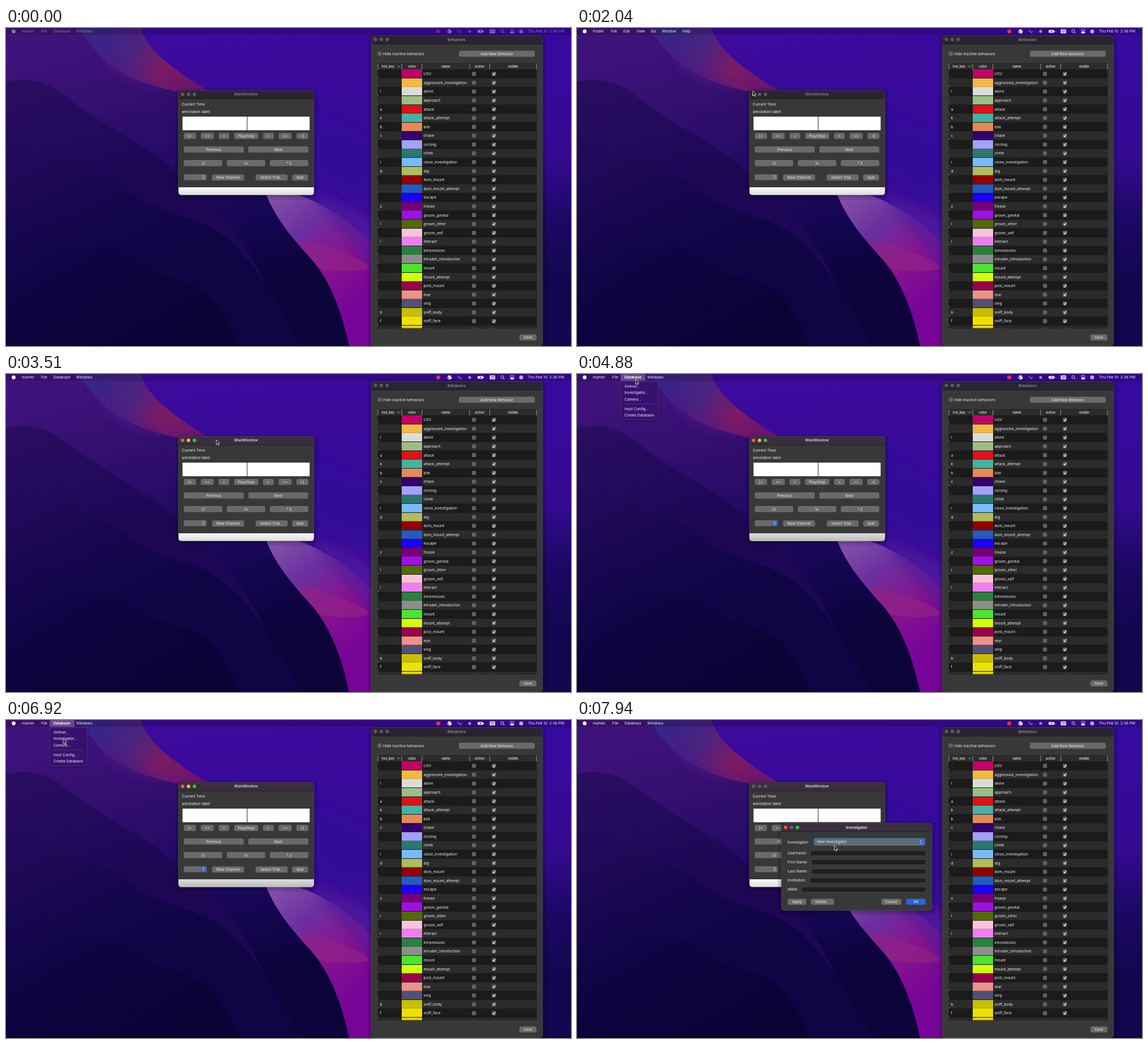
Write an HTML page that moves like this. It is 998 by 561 pixels and loops after 8 s.

```html
<!DOCTYPE html>
<html lang="en">
<head>
<meta charset="utf-8">
<title>Desktop session</title>
<style>
  html, body { margin: 0; width: 100%; height: 100%; overflow: hidden; background: #1b0752; }
  svg { display: block; width: 100vw; height: 100vh; }
  text { font: 6.6px Inter, "Open Sans", sans-serif; fill: #f2f2f2; white-space: pre; }
  .bold { font-weight: 600; }
  .head { font-size: 5.85px; font-weight: 500; }
</style>
</head>
<body>
<svg id="stage" viewBox="0 0 998 561" xmlns="http://www.w3.org/2000/svg"></svg>
<script>
const LOOP = 8000;
const stage = document.getElementById('stage');

// Drawing helpers
const rect = (x, y, x2, y2, fill, r = 0, more = '') =>
  `<rect x="${x}" y="${y}" width="${x2 - x}" height="${y2 - y}" rx="${r}" fill="${fill}" ${more}/>`;
const circle = (x, y, r, fill, more = '') => `<circle cx="${x}" cy="${y}" r="${r}" fill="${fill}" ${more}/>`;
const path = (d, fill, more = '') => `<path d="${d}" fill="${fill}" ${more}/>`;
const line = (d, color, width = 1) => path(d, 'none', `stroke="${color}" stroke-width="${width}"`);
const label = (x, cy, s, more = '') =>
  `<text x="${x}" y="${cy + 2.35}" ${more}>${s.replace(/</g, '&lt;').replace(/>/g, '&gt;')}</text>`;
const centered = (x, cy, s, more = '') => label(x, cy, s, `text-anchor="middle" ${more}`);
const group = (id, body, more = '') => `<g id="${id}" ${more}>${body}</g>`;
const button = (x, x2, cy, s, fill = '#6a6a6a') =>
  rect(x, cy - 5.3, x2, cy + 5.3, fill, 2.5) +
  line(`M${x + 2} ${cy - 5}H${x2 - 2}`, 'rgba(255,255,255,.15)', .5) + centered((x + x2) / 2, cy, s);
const arrows = (x, cy) =>
  line(`M${x - 1.6} ${cy - 1}l1.6 -1.7 1.6 1.7M${x - 1.6} ${cy + 1}l1.6 1.7 1.6 -1.7`, '#fff', .9);
const knob = (x, cy) => rect(x - 4.2, cy - 4.3, x + 4.2, cy + 4.3, '#2b68dc', 2) + arrows(x, cy);
const lights = (x, cy, colors) => colors.map((c, i) => circle(x + i * 10.4, cy, 3.1, c)).join('');
const GREY = Array(3).fill('#5d5761');
const gradient = (id, coords, ...stops) => {
  const [x1, y1, x2, y2] = coords;
  return `<linearGradient id="${id}" gradientUnits="userSpaceOnUse" x1="${x1}" y1="${y1}" x2="${x2}" y2="${y2}">` +
    stops.map((c, i) => `<stop offset="${i / (stops.length - 1)}" stop-color="${c}"/>`).join('') + '</linearGradient>';
};

function wallpaper() {
  const defs = '<defs>' +
    gradient('sky', [500, 0, 560, 561], '#3d0a9c', '#380a9a', '#380b98', '#5a149b', '#680596') +
    gradient('edge', [0, 0, 0, 561], '#360a9f', '#360a9a', '#350a92', '#1c0865', '#13064e', '#14064f') +
    gradient('glow', [470, 300, 620, 480], '#8450aa', '#6b2f9f', '#86148f', '#760597') +
    gradient('hill', [170, 0, 290, 500], '#40137c', '#340f70', '#250a66', '#150653', '#0b033a') +
    gradient('ridge', [170, 15, 325, 112], '#3b2487', '#4d237f', '#7c1b63', '#6b1570') +
    gradient('wave1', [60, 90, 120, 290], '#2a0d60', '#230a5a', '#1d0755') +
    gradient('wave2', [80, 210, 190, 440], '#210a5a', '#15064d', '#0f0444') +
    gradient('wave3', [80, 320, 220, 561], '#170650', '#0c0440', '#0a0336') +
    gradient('status', [0, 281, 0, 294], '#f8f8f8', '#dedede') +
    gradient('statusOn', [0, 281, 0, 294], '#dddddd', '#bdbdbd') +
    '<filter id="soft" x="-10%" y="-10%" width="120%" height="120%"><feGaussianBlur stdDeviation="7"/></filter></defs>';
  return defs +
    rect(0, 0, 998, 561, 'url(#sky)') +
    rect(940, 0, 998, 561, 'url(#edge)') +
    path('M390 150C500 180 545 280 650 330V200C560 140 480 120 390 150Z', '#2d099a', 'opacity=".5" filter="url(#soft)"') +
    path('M450 280C510 286 580 310 650 385V561H590Z', 'url(#glow)') +
    path('M545 292C580 300 620 320 650 350V430C620 380 570 350 545 292Z', '#4b1c9c', 'opacity=".55" filter="url(#soft)"') +
    path('M502 388C530 370 555 378 580 392C605 402 630 405 642 424C605 436 545 425 515 412Z', '#932284', 'opacity=".65"') +
    path('M0 0H130C180 65 250 100 330 112C400 165 435 235 460 295C478 340 510 375 535 403C570 440 592 495 606 561H0Z', 'url(#hill)') +
    path('M125 0H238C250 40 290 70 368 118C290 118 205 90 165 48Z', 'url(#ridge)') +
    path('M172 25C200 70 240 88 300 105C245 112 195 96 172 62Z', '#4b1282', 'opacity=".55" filter="url(#soft)"') +
    path('M0 95C45 86 75 97 105 120C140 148 170 165 210 190C250 215 285 232 310 270C380 310 450 400 500 561H0Z', 'url(#wave1)') +
    path('M0 208C35 190 70 214 105 235C145 258 180 253 215 285C270 335 350 325 405 385C450 430 490 500 520 561H0Z', 'url(#wave2)') +
    path('M0 335C35 318 65 333 90 360C130 400 175 365 215 405C265 450 330 430 370 485C390 510 405 540 412 561H0Z', 'url(#wave3)') +
    rect(0, 0, 998, 12, '#000', 0, 'opacity=".16"');
}

const menuTitles = items => items.map(([x, s], i) => label(x, 6, s, i ? 'font-weight="500"' : 'font-weight="700"')).join('');

function menuBar() {
  const white = '#f0edf6';
  const icons =
    circle(13.5, 6, 3.4, white) +
    circle(763.5, 6, 3.6, '#d23a4c') +
    circle(783.5, 6, 3.8, white) + line('M780 5L783 7 782 9M784 3L786 5 787 4', '#47249c', 1) +
    line('M797 6h2l1 -2 2 5 1 -3h3M797 2l8 8', '#9d8bd0', .7) +
    circle(819, 6, 2.6, '#9d8bd0') +
    rect(833, 3.4, 843, 8.6, white, 1.5) + rect(843.5, 5, 844.5, 7, white) + path('M839 3.7l-2.5 2.8h1.6l-.7 2 2.6 -3h-1.7Z', '#33118b') +
    rect(854.5, 2.5, 864, 9.5, white, 1) + line('M856 4.5h7M856 6h7M857.5 8h4', '#47249c', .7) +
    circle(876.6, 5.4, 2.5, 'none', `stroke="${white}" stroke-width=".9"`) + line('M878.4 7.2l2.3 2.4', white, .9) +
    rect(890.5, 2.5, 897.5, 5.5, 'none', 1.5, `stroke="${white}" stroke-width=".7"`) + rect(890.5, 6.6, 897.5, 9.6, white, 1.5) +
    circle(910, 6, 3.5, '#b9a9d8') +
    label(922, 6, 'Thu Feb 10  2:36 PM', 'font-weight="500"');
  return group('bar-content', icons +
    group('app-menu', menuTitles([[28, 'marten'], [62, 'File'], [84, 'Database'], [124, 'Windows']])) +
    group('desk-menu', menuTitles([[28, 'Folder'], [60, 'File'], [82, 'Edit'], [105, 'View'], [130.5, 'Go'], [150, 'Window'], [186, 'Help']])));
}

const frame = (x, y, x2, y2, titleId, titleFill) =>
  [2, 4, 7].map(d => rect(x - d, y - d / 2, x2 + d, y2 + d * 1.2, '#000', 5 + d, 'opacity=".09"')).join('') +
  rect(x, y, x2, y2, '#383838', 5) +
  path(`M${x} ${y + 14.5}V${y + 5}q0 -5 5 -5H${x2 - 5}q5 0 5 5V${y + 14.5}Z`, titleFill, `id="${titleId}"`) +
  line(`M${x} ${y + 14.8}H${x2}`, '#171519', .7) +
  rect(x, y, x2, y2, 'none', 5, 'stroke="#706b75" stroke-opacity=".65" stroke-width=".6"');

function mainWindow() {
  const row = (cy, items) => items.map(([x, x2, s]) => button(x, x2, cy, s)).join('');
  const status = 'M304.8 281H543.8V289.5q0 5 -5 5H309.8q-5 0 -5 -5Z';
  return frame(304.5, 110, 544, 294.5, 'main-title', '#2a242f') +
    group('lights-off', lights(312, 117, GREY)) +
    group('lights-on', lights(312, 117, ['#f5584f', '#f5bd2f', '#2fc840'])) +
    centered(424, 117, 'MainWindow', 'class="bold" id="main-name"') +
    label(310.5, 134.5, 'Current Time') + label(310.5, 147.3, 'annotation label') +
    rect(311.3, 156, 536.8, 180.8, '#fff', 0, 'stroke="#222" stroke-width=".6"') + line('M426 156V180.8', '#222', 1) +
    row(190.5, [[314, 335.5, '|<'], [344, 367, '<<'], [375.5, 394.5, '<'], [403, 445.5, 'Play/Stop'],
      [454, 473, '>'], [481.5, 504.5, '>>'], [513, 534, '>|']]) +
    row(214.4, [[314, 420, 'Previous'], [428, 534, 'Next']]) +
    row(238.4, [[314, 382, '/2'], [390, 458, '1x'], [466, 534, '* 2']]) +
    row(263.7, [[364, 420.5, 'New Channel'], [441, 497.5, 'Select Trial...'], [505.5, 533.5, 'Quit']]) +
    rect(314, 258, 354.5, 268.5, '#6a6a6a', 2.5) + arrows(349, 263.2) + group('combo-on', knob(349, 263.2)) +
    path(status, 'url(#status)') + path(status, 'url(#statusOn)', 'id="status-on"');
}

const BEHAVIORS = `USV,,c3006a aggressive_investigation,,f4b942 alone,l,d9dbdc approach,,9dbd86 attack,a,e01018
attack_attempt,k,42b3a3 bite,b,e58a57 chase,c,33006e circling,,a3a0fa climb,,2d776e close_investigation,i,78bafa
dig,d,b0bd59 dom_mount,,930000 dom_mount_attempt,,265abd escape,,1a00fa freeze,z,75007a groom_genital,,9d12e0
groom_other,l,526b00 groom_self,,fac2dd interact,i,f27cf6 intromission,,2b803f intruder_introduction,,8d8d8d
mount,,4ae62f mount_attempt,,d2ff0a post_mount,,9b004a rear,,ee9186 sing,,50507a sniff_body,b,c7be07
sniff_face,f,eee000 sniff_genital,,e4d505`.split(/\s+/).map(row => row.split(','));

function behaviorWindow() {
  const box = (x, cy) => rect(x, cy - 3.6, x + 7.2, cy + 3.6, '#626262', 1.6);
  const rows = BEHAVIORS.map(([name, key, color], i) => {
    const top = 73.2 + i * 15.58, cy = top + 7.7;
    return rect(657, top, 937, top + 15.58, i % 2 ? '#2b2b2b' : '#1b1b1b') +
      rect(699, Math.round(top), 735, Math.round(top) + 15, '#' + color) +
      line(`M657.2 ${top + 12.5}v2.6`, '#aaa', .6) + line(`M657 ${top + 15.4}H937`, '#151515', .5) +
      label(660.5, cy, key) + label(737.5, cy, name) + box(823, cy) + box(858.2, cy) +
      line(`M859.8 ${cy + .2}l1.6 1.9 2.6 -4.3`, '#fff', 1.1);
  }).join('');
  const heads = [[675, 'hot_key'], [717, 'color'], [777, 'name'], [836.5, 'active'], [895.7, 'visible']];
  return frame(645.5, 13.5, 948, 560.5, 'list-title', '#29242f') +
    lights(652.5, 20.2, GREY) + centered(796, 20.2, 'Behaviors', 'class="bold" style="fill:#969199"') +
    box(656.5, 45.2) + label(666, 45.2, 'Hide inactive behaviors') + button(800, 934, 45.5, 'Add New Behavior') +
    rect(656.5, 62, 937.5, 530, '#1b1b1b') + rect(657, 62.5, 937, 73, '#2c2c2c') +
    '<clipPath id="list"><path d="M656 73H938V529.5H656Z"/></clipPath>' + `<g clip-path="url(#list)">${rows}</g>` +
    heads.map(([x, s]) => centered(x, 67.8, s, 'class="head"')).join('') +
    line('M691.3 66.8l2 2 2 -2', '#eee', .8) +
    line([657, 699, 734.8, 819, 854.5, 937].map(x => `M${x} 63V73`).join(''), '#c8c8c8', .7) +
    button(907, 937, 546, 'Save');
}

const MENU_ROWS = [[21.5, 'Animal...'], [33, 'Investigator...'], [44.6, 'Camera...'], [61.6, 'Host Config...'], [73, 'Create Database']];

function dropMenu() {
  return rect(77, 0, 121, 12, '#fff', 2, 'opacity=".24"') + label(84, 6, 'Database', 'font-weight="500"') +
    rect(75.5, 13, 145.5, 84, '#000', 5, 'opacity=".18"') +
    rect(77, 13.2, 143.8, 80.8, '#381170', 3.2, 'stroke="#67478f" stroke-width=".6"') +
    rect(79.5, 0, 141.5, 11.4, '#2c60d6', 2, 'id="choice"') +
    MENU_ROWS.map(([cy, s]) => label(84, cy, s, 'font-weight="500"')).join('') +
    line('M83.5 53H137', 'rgba(255,255,255,.2)', .7);
}

function dialog() {
  const fields = [[235, 412.5, 'Username:'], [251, 414, 'First Name:'], [267, 414, 'Last Name:'], [283, 411.5, 'Institution:'], [299, 397, 'eMail:']];
  return frame(361, 182, 627, 336, 'dialog-title', '#382f3c') +
    lights(368.5, 189.5, ['#f5584f', '#66606a', '#2fc840']) + centered(494, 189.5, 'Investigator', 'class="bold"') +
    label(372, 215.4, 'Investigator:') +
    rect(419, 209.4, 614, 220.6, '#666', 3, 'stroke="#3c7fae" stroke-width="1.6"') +
    label(424, 214.8, 'New Investigator') + knob(607.3, 215) +
    fields.map(([cy, x, s]) => label(372, cy - .3, s) +
      rect(x, cy - 4.7, 616, cy + 4.7, '#1f1f1f', 0, 'stroke="#515151" stroke-width=".7"')).join('') +
    button(372, 405, 320.7, 'Apply') + button(413, 454, 320.7, 'Delete...') +
    button(538, 573, 320.7, 'Cancel') + button(581.5, 616, 320.7, 'OK', '#2864dc');
}

stage.innerHTML = wallpaper() + menuBar() + behaviorWindow() + mainWindow() +
  group('dialog', dialog()) + group('menu', dropMenu()) +
  group('cursor', path('M0 0V8.4L2 6.6 3.3 9.6 4.8 9 3.5 6.1H6Z', '#111', 'stroke="#fff" stroke-width=".75" stroke-linejoin="round"'));

// Pointer moves: start, end, step count, then [step, x, y] waypoints
const MOVES = [
  [1120, 1180, 2, [[1, 128.5, 154.5], [2, 162.5, 188]]],
  [1430, 1610, 3, [[0, 162.5, 188], [3, 244, 201]]],
  [1870, 2140, 6, [[0, 244, 201], [1, 244, 201], [4, 310.5, 111], [6, 305, 160]]],
  [2390, 2950, 8, [[0, 305, 160], [7, 132, 6], [8, 129, 2]]],
  [3110, 3580, 7, [[0, 129, 2], [5, 371.5, 116], [7, 371.5, 116]]],
  [3830, 3900, 2, [[0, 371.5, 116], [2, 149.5, 15]]],
  [4150, 4460, 5, [[0, 149.5, 15], [3, 104, 4], [5, 104, 3]]],
  [4880, 5110, 4, [[0, 104, 3], [1, 103.5, 9.5], [3, 101.5, 37], [4, 101, 46.5]]],
  [5440, 5680, 4, [[0, 101, 46.5], [4, 101, 33.5]]],
  [6920, 7690, 11, [[0, 101, 33.5], [2, 101, 33.5], [7, 291, 165], [10, 446, 220], [11, 451, 221.5]]],
  [7940, 7940, 1, [[1, 454.5, 221.5]]]
];
const CHOOSE = MOVES[9];

const stepOf = (t, [start, end, n]) =>
  t < start ? 0 : n === 1 ? 1 : Math.min(n, 1 + Math.floor((t - start) / (end - start) * (n - 1) + .04));

function pointerAt(t) {
  const move = MOVES.filter(m => m[0] <= t).pop();
  if (!move) return null;
  const step = stepOf(t, move), pts = move[3];
  const next = Math.max(0, pts.findIndex(p => p[0] >= step));
  const b = pts[next], a = pts[Math.max(0, next - 1)];
  const f = b === a ? 0 : (step - a[0]) / (b[0] - a[0]);
  return [a[1] + (b[1] - a[1]) * f, a[2] + (b[2] - a[2]) * f];
}

const part = Object.fromEntries([...stage.querySelectorAll('[id]')].map(e => [e.id, e]));
const show = (id, alpha) => {
  part[id].style.display = alpha ? '' : 'none';
  part[id].style.opacity = Number(alpha);
};

function render(t) {
  const closing = stepOf(t, CHOOSE);
  const awake = t >= 1920, focused = t >= 3505, inFront = focused && closing < 6;
  const settled = t >= 3580 && closing < 6;
  const onDesk = awake && !focused;

  part['bar-content'].style.opacity = awake ? 1 : .45;
  show('app-menu', !onDesk);
  show('desk-menu', onDesk);
  show('lights-on', inFront);
  show('lights-off', !inFront);
  show('combo-on', settled);
  show('status-on', settled);
  part['main-title'].setAttribute('fill', focused ? '#382f3c' : '#2a242f');
  part['main-name'].style.fill = focused ? '#d8d4da' : '#837e86';

  const pointer = pointerAt(t);
  show('cursor', !!pointer);
  if (pointer) part.cursor.setAttribute('transform', `translate(${pointer})`);

  show('menu', t < 4380 ? 0 : closing < 3 ? 1 : closing === 3 ? .5 : 0);
  const row = pointer && MENU_ROWS.find(([cy]) => Math.abs(pointer[1] - cy) <= 5.8);
  const chosen = closing ? MENU_ROWS[1] : row;
  show('choice', !!chosen && closing !== 1);
  if (chosen) part.choice.setAttribute('y', chosen[0] - 5.7);

  const [scale, alpha] = closing < 7 ? [1, 0] : [[.63, .66], [.87, .9], [.97, 1]][closing - 7] || [1, 1];
  show('dialog', alpha);
  part.dialog.setAttribute('transform', `translate(494 259) scale(${scale}) translate(-494 -259)`);
}

const began = performance.now();
(function tick() {
  render((performance.now() - began) % LOOP);
  requestAnimationFrame(tick);
})();
</script>
</body>
</html>
```
